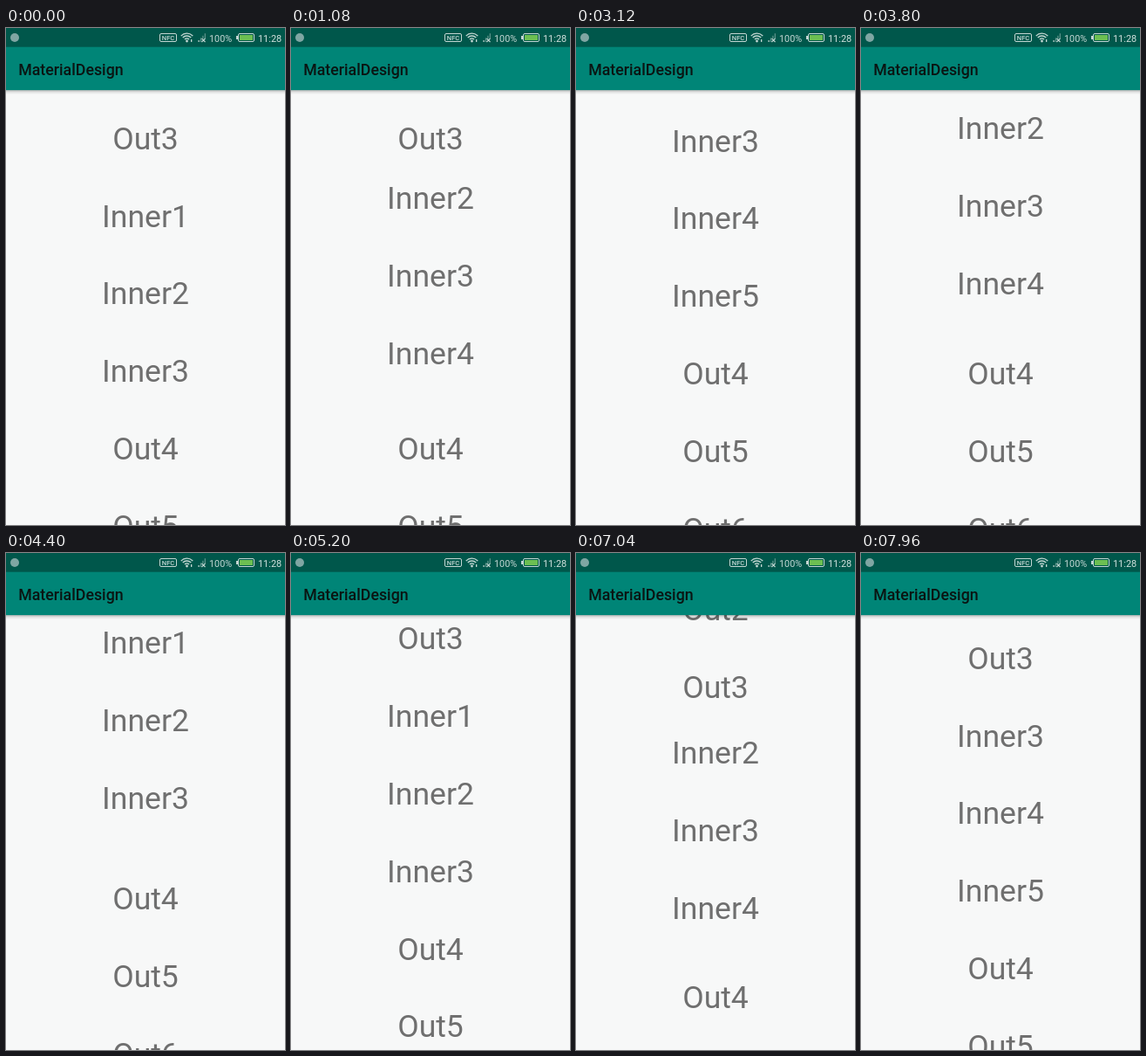
Animation of 320 by 569 pixels, one loop 8000 ms. Source, as an HTML page with a canvas:

```html
<!DOCTYPE html>
<html lang="en">
<head>
<meta charset="utf-8">
<title>Nested scrolling</title>
<style>
html, body { margin: 0; width: 100%; height: 100%; overflow: hidden; background: #f7f8f8; }
canvas { display: block; width: 320px; height: 569px; }
</style>
</head>
<body>
<canvas id="stage"></canvas>
<script>
const W = 320, H = 569, LOOP = 8000, STEP = 40;
const ROW = 800 / 9;            // height of one list row
const VIEW = ROW * 3;           // height of the inner list
const INNER_MAX = ROW * 2;      // five inner rows, three visible
const OUT3_TOP = 82, BAR = 71.1;
const FONT = 'Roboto, sans-serif';

const canvas = document.getElementById('stage');
const ctx = canvas.getContext('2d');
const dpr = window.devicePixelRatio || 1;
canvas.width = Math.round(W * dpr);
canvas.height = Math.round(H * dpr);

// Finger travel per drag: [ms, distance in px, speed in px/s]
const drags = [
  { dir: 1, outer: 0, keys: [[240, 0, 90], [1080, 109, 125], [2120, 214.8, 80], [3120, 263.8, 10]] },
  { dir: -1, outer: -86, keys: [[3200, 0, 110], [4400, 151, 118], [6040, 288.8, 35], [6160, 290.8, 0]] },
  { dir: 1, outer: 27, keys: [[6200, 0, 100], [6960, 92, 132], [7960, 210.8, 95]] }
];

function travel(keys, t) {
  const last = keys[keys.length - 1];
  if (t <= keys[0][0]) return 0;
  if (t >= last[0]) return last[1];
  const i = keys.findIndex(k => k[0] > t);
  const [t0, p0, v0] = keys[i - 1], [t1, p1, v1] = keys[i];
  const d = t1 - t0, u = (t - t0) / d, w = 1 - u;
  return p0 * w * w * (1 + 2 * u) + p1 * u * u * (3 - 2 * u)
    + d / 1000 * u * w * (v0 * w - v1 * u);
}

// The inner list takes each drag first, the outer list takes the rest.
function scrollAt(t) {
  const drag = drags.filter((d, i) => i === 0 || t >= d.keys[0][0]).pop();
  const dist = travel(drag.keys, t);
  const used = Math.min(dist, INNER_MAX);
  return {
    inner: drag.dir > 0 ? used : INNER_MAX - used,
    outer: drag.outer - drag.dir * (dist - used)
  };
}

function text(str, x, y, size, color, align = 'left', weight = 400) {
  ctx.font = `${weight} ${size}px ${FONT}`;
  ctx.fillStyle = color;
  ctx.textAlign = align;
  ctx.fillText(str, x, y);
}

function row(label, top) {
  if (top > -ROW && top < H) text(label, W / 2, top + ROW / 2 + 12.2, 35.56, '#6f6f6f', 'center');
}

function clipped(y, h, draw) {
  ctx.save();
  ctx.beginPath();
  ctx.rect(0, y, W, h);
  ctx.clip();
  draw();
  ctx.restore();
}

function drawLists({ inner, outer }) {
  const top = OUT3_TOP + outer, view = top + ROW;
  for (let n = 1; n <= 3; n++) row('Out' + n, top + (n - 3) * ROW);
  clipped(view, VIEW, () => {
    for (let n = 1; n <= 5; n++) row('Inner' + n, view + (n - 1) * ROW - inner);
  });
  for (let n = 4; n <= 7; n++) row('Out' + n, view + VIEW + (n - 4) * ROW);
}

function drawStatus() {
  const ink = '#c3d6d2';
  ctx.fillStyle = '#7fa6a3';
  ctx.beginPath();
  ctx.arc(10, 11, 5, 0, 7);
  ctx.fill();

  ctx.strokeStyle = ink;
  ctx.lineWidth = 1;
  ctx.beginPath();
  ctx.roundRect(176.5, 6.5, 19, 9, 1.5);
  ctx.stroke();
  text('NFC', 186, 14, 7.6, ink, 'center', 500);

  // Wi-Fi
  ctx.lineWidth = 1.3;
  for (const r of [3.5, 6.5, 9.3]) {
    ctx.beginPath();
    ctx.arc(207.5, 15.5, r, -Math.PI * 0.76, -Math.PI * 0.24);
    ctx.stroke();
  }
  ctx.fillStyle = ink;
  ctx.beginPath();
  ctx.arc(207.5, 15, 1.4, 0, 7);
  ctx.fill();
  ctx.fillRect(212, 13, 1.3, 3);

  // No signal
  ctx.fillRect(220.5, 14, 1.2, 2);
  ctx.globalAlpha = 0.5;
  for (let i = 1; i < 4; i++) ctx.fillRect(220.5 + i * 2.4, 14 - i * 2.6, 1.2, i < 2 ? 4.6 : i * 2.6 - 2);
  ctx.globalAlpha = 1;
  ctx.lineWidth = 1.1;
  ctx.beginPath();
  ctx.moveTo(224.5, 12); ctx.lineTo(228.5, 16);
  ctx.moveTo(228.5, 12); ctx.lineTo(224.5, 16);
  ctx.stroke();

  text('100%', 233, 15.5, 10.8, ink);

  // Battery
  ctx.lineWidth = 1;
  ctx.beginPath();
  ctx.roundRect(266.5, 6.5, 18, 9, 1.5);
  ctx.stroke();
  ctx.fillStyle = ink;
  ctx.fillRect(264, 9, 2, 4);
  ctx.fillStyle = '#6cbf52';
  ctx.fillRect(268, 8, 15, 6);

  text('11:28', 289, 15.5, 10.9, '#d3e2de');
}

function drawBars() {
  const shade = ctx.createLinearGradient(0, BAR, 0, BAR + 5);
  shade.addColorStop(0, 'rgba(0,0,0,.3)');
  shade.addColorStop(0.4, 'rgba(0,0,0,.1)');
  shade.addColorStop(1, 'rgba(0,0,0,0)');
  ctx.fillStyle = shade;
  ctx.fillRect(0, BAR, W, 5);
  ctx.fillStyle = '#008577';
  ctx.fillRect(0, 0, W, BAR);
  ctx.fillStyle = '#00574b';
  ctx.fillRect(0, 0, W, 21.7);
  text('MaterialDesign', 14.2, 53.7, 17.78, '#0a1412', 'left', 500);
  drawStatus();
}

const start = performance.now();
function frame() {
  const t = Math.floor(((performance.now() - start) % LOOP) / STEP) * STEP;
  ctx.setTransform(dpr, 0, 0, dpr, 0, 0);
  ctx.fillStyle = '#f7f8f8';
  ctx.fillRect(0, 0, W, H);
  clipped(BAR, H - BAR, () => drawLists(scrollAt(t)));
  drawBars();
  requestAnimationFrame(frame);
}
frame();
</script>
</body>
</html>
```
